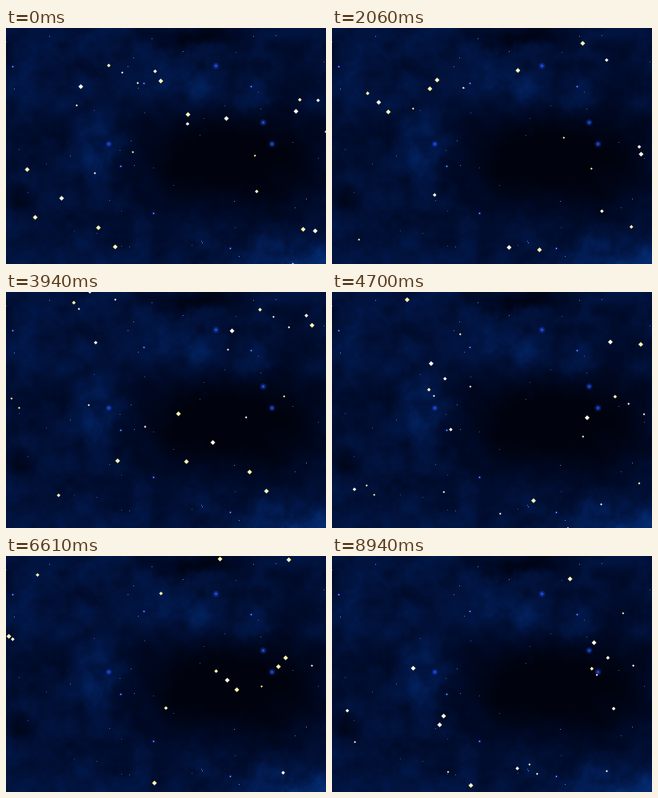
Animation, 400 px wide and 296 px high, one loop 8970 ms. Source, as an HTML page with a canvas:

```html
<!DOCTYPE html>
<html lang="en">
<head>
<meta charset="utf-8">
<title>Falling stars</title>
<style>
html, body { margin: 0; width: 100%; height: 100%; overflow: hidden; background: #00030f; }
canvas { position: absolute; left: 0; top: 0; display: block; }
</style>
</head>
<body>
<canvas id="sky" width="400" height="296"></canvas>
<canvas id="stars" width="400" height="296"></canvas>
<script>
const W = 400, H = 296, LOOP = 8970, STEP = 30.3;
const SPEED_X = 0.048, SPEED_Y = 0.144;
const TILE_W = 2 * W, TILE_H = 2 * H;
const PALE = '#fffeea', YELLOW = '#fffbae';

const sky = document.getElementById('sky').getContext('2d');
const ctx = document.getElementById('stars').getContext('2d');
const mod = (a, n) => ((a % n) + n) % n;

// Small seeded generator
function randomFrom(seed) {
  return () => {
    seed = (seed * 1664525 + 1013904223) % 4294967296;
    return seed / 4294967296;
  };
}

function hash(x, y) {
  const s = Math.sin(x * 127.1 + y * 311.7) * 43758.5453;
  return s - Math.floor(s);
}

function noise(x, y) {
  const ix = Math.floor(x), iy = Math.floor(y);
  let u = x - ix, v = y - iy;
  u *= u * (3 - 2 * u);
  v *= v * (3 - 2 * v);
  const top = hash(ix, iy) * (1 - u) + hash(ix + 1, iy) * u;
  const low = hash(ix, iy + 1) * (1 - u) + hash(ix + 1, iy + 1) * u;
  return top * (1 - v) + low * v;
}

function fbm(x, y) {
  let sum = 0, amp = 0.5;
  for (let i = 0; i < 5; i++, amp *= 0.55, x *= 2.03, y *= 2.03) sum += amp * noise(x, y);
  return sum;
}

// Bright and dark clouds: x, y, radius x, radius y, strength
const clouds = [
  [235, 165, 88, 72, -0.42], [345, 165, 75, 85, -0.32], [240, 10, 58, 15, -0.34],
  [45, 135, 45, 24, -0.14], [15, 210, 24, 22, -0.22],
  [110, 150, 24, 36, 0.24], [235, 78, 36, 36, 0.24], [310, 85, 22, 26, 0.2],
  [360, 302, 90, 30, 0.45]
];

function paintClouds() {
  const img = sky.createImageData(W, H);
  for (let y = 0, p = 0; y < H; y++) {
    for (let x = 0; x < W; x++, p += 4) {
      const wx = x + 40 * (fbm(x / 30, y / 30) - 0.5);
      const wy = y + 40 * (fbm(x / 30 + 40, y / 30 + 9) - 0.5);
      let k = 0.42;
      for (const [cx, cy, rx, ry, a] of clouds) {
        k += a * Math.exp(-(((wx - cx) / rx) ** 2) - ((wy - cy) / ry) ** 2);
      }
      k = Math.max(0, k) * (0.42 + 1.1 * fbm(x / 24 + 7, y / 24 + 3));
      img.data[p] = 5 * k * k;
      img.data[p + 1] = 2 + 30 * k + 18 * k * k;
      img.data[p + 2] = 13 + 110 * k;
      img.data[p + 3] = 255;
    }
  }
  sky.putImageData(img, 0, 0);
}

function glow(x, y, r, core) {
  const g = sky.createRadialGradient(x, y, 0, x, y, r);
  g.addColorStop(0, core);
  g.addColorStop(0.3, 'rgba(30,80,245,0.6)');
  g.addColorStop(1, 'rgba(10,50,190,0)');
  sky.fillStyle = g;
  sky.fillRect(x - r, y - r, 2 * r, 2 * r);
}

function paintSky() {
  paintClouds();
  const blue = [[262, 47], [321, 118], [128, 145], [332, 145]];
  const bright = [[8, 48], [172, 69], [306, 73], [143, 173], [184, 232], [280, 276]];
  for (const [x, y] of blue) glow(x + 0.5, y + 0.5, 5, '#3d6cf0');
  for (const [x, y] of bright) glow(x + 0.5, y + 0.5, 2.5, '#b8dcff');

  const rnd = randomFrom(11);
  for (let i = 0; i < 44; i++) {
    sky.fillStyle = `rgba(140,175,230,${0.4 + 0.5 * rnd()})`;
    sky.fillRect(Math.floor(rnd() * W), Math.floor(rnd() * H), 1, 1);
  }
}

// Falling diamonds on a repeating tile: placed large ones, scattered small ones
const large = {
  [YELLOW]: [[193, 67], [227, 109], [26, 178], [36, 238], [115, 251], [136, 275],
    [371, 253], [214, 315], [133, 349], [32, 361], [23, 372], [-29, 401], [160, 574],
    [-132, 518], [-50, 237], [-314, 334], [-256, 185]],
  [PALE]: [[93, 74], [275, 114], [362, 105], [386, 255], [69, 214], [-41, 389],
    [287, 454], [122, 571], [-102, 6], [-290, 98], [-295, 109], [-328, 38]]
};

function makeStars() {
  const stars = [];
  for (const colour in large) {
    for (const [x, y] of large[colour]) stars.push({ x, y, r: 3, colour });
  }
  const rnd = randomFrom(5);
  for (let i = 0; i < 48; i++) {
    stars.push({
      x: rnd() * TILE_W,
      y: rnd() * TILE_H,
      r: i % 2 ? 2.3 : 1.4,
      colour: rnd() < 0.4 ? YELLOW : PALE
    });
  }
  return stars;
}

const stars = makeStars();

function diamond(x, y, r) {
  ctx.beginPath();
  ctx.moveTo(x, y - r);
  ctx.lineTo(x + r, y);
  ctx.lineTo(x, y + r);
  ctx.lineTo(x - r, y);
  ctx.fill();
}

function draw(now) {
  const t = Math.floor((mod(now, LOOP) + 6) / STEP) * STEP;
  const dx = t * SPEED_X + 0.5, dy = t * SPEED_Y - 0.5;
  ctx.clearRect(0, 0, W, H);
  for (const { x, y, r, colour } of stars) {
    ctx.fillStyle = colour;
    diamond(mod(x + dx + 5, TILE_W) - 5, mod(y + dy + 5, TILE_H) - 5, r);
  }
}

function tick(now) {
  draw(now);
  requestAnimationFrame(tick);
}

paintSky();
draw(0);
requestAnimationFrame(tick);
</script>
</body>
</html>
```
